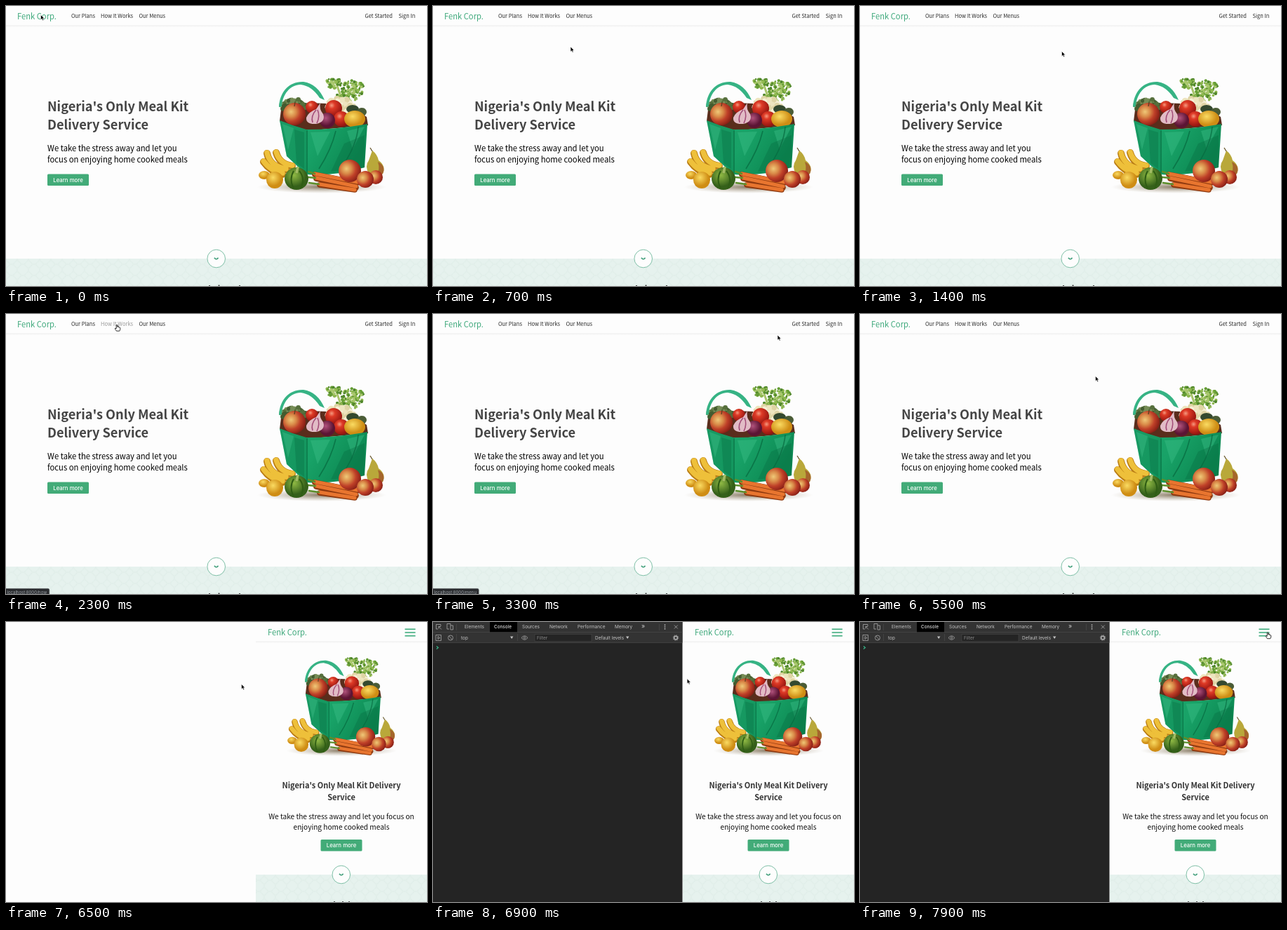
Animation of 600x399 px, one loop 8 s. Source, as an HTML page:

```html
<!DOCTYPE html>
<html lang="en">
<head>
<meta charset="utf-8">
<title>Meal kit landing page</title>
<style>
html, body { margin: 0; width: 100%; height: 100%; overflow: hidden; background: #fdfdfd; }
svg { display: block; width: 600px; height: 399px; }
.page { font-family: "Noto Sans CJK JP", "Noto Sans CJK SC", "Noto Sans CJK", "Noto Sans", sans-serif; }
.brand { font-size: 11.2px; fill: #3fa97c; text-anchor: start; }
.nav { font-size: 7.5px; fill: #2b2b2b; }
.nav .hover { fill: #999; }
.title { font-size: 18.2px; font-weight: 700; fill: #444; }
.lead { font-size: 11.27px; fill: #000; }
.narrow { text-anchor: middle; }
.narrow .title { font-size: 11px; fill: #333; }
.narrow .lead { font-size: 10.1px; font-weight: 300; fill: #111; }
.button text { font: 500 7.8px Inter, sans-serif; fill: #fff; text-anchor: middle; }
.tools { font: 6.45px Inter, sans-serif; fill: #c4c4c4; }
#url { font: 6px Inter, sans-serif; fill: #9aa0a6; }
.line { fill: none; stroke: #a9a9a9; stroke-width: .8; }
</style>
</head>
<body>
<svg viewBox="0 0 600 399">
  <defs>
    <pattern id="rings" width="16" height="16" patternUnits="userSpaceOnUse">
      <g fill="none" stroke="#e0eee9" stroke-width=".8">
        <circle cx="8" cy="8" r="7.6"/><circle r="5"/><circle cx="16" r="5"/>
        <circle cy="16" r="5"/><circle cx="16" cy="16" r="5"/>
      </g>
    </pattern>
    <radialGradient id="apple" cx=".35" cy=".4" r=".65">
      <stop offset="0" stop-color="#efc878"/><stop offset=".35" stop-color="#d98a48"/>
      <stop offset=".65" stop-color="#bf4028"/><stop offset="1" stop-color="#8a2016"/>
    </radialGradient>
    <radialGradient id="red" cx=".38" cy=".32" r=".65">
      <stop offset="0" stop-color="#f59a80"/><stop offset=".3" stop-color="#de3a26"/><stop offset="1" stop-color="#981510"/>
    </radialGradient>
    <radialGradient id="yellow" cx=".4" cy=".35">
      <stop offset="0" stop-color="#fadb62"/><stop offset="1" stop-color="#cf8d14"/>
    </radialGradient>
    <radialGradient id="green" cx=".4" cy=".35">
      <stop offset="0" stop-color="#8fb944"/><stop offset="1" stop-color="#35601a"/>
    </radialGradient>
    <radialGradient id="purple" cx=".4" cy=".35">
      <stop offset="0" stop-color="#b0527c"/><stop offset="1" stop-color="#5c1434"/>
    </radialGradient>
    <radialGradient id="shade">
      <stop offset="0" stop-color="#6b5a40" stop-opacity=".8"/><stop offset="1" stop-color="#a89a80" stop-opacity="0"/>
    </radialGradient>
    <linearGradient id="cloth" x2="1" y2=".4">
      <stop offset="0" stop-color="#1fa56d"/><stop offset=".5" stop-color="#18a267"/><stop offset="1" stop-color="#0c8852"/>
    </linearGradient>
    <linearGradient id="fade" x2="0" y2="1">
      <stop offset="0" stop-color="#ededed"/><stop offset="1" stop-color="#fdfdfd"/>
    </linearGradient>

    <g id="photo">
      <ellipse cx="450" cy="258" rx="92" ry="9" fill="url(#shade)"/>
      <path d="M480 140Q476 124 470 108M485 142Q487 126 494 116" fill="none" stroke="#a8c46a" stroke-width="3"/>
      <g id="leaves"></g>
      <path d="M390 164L392 148L430 138L486 140L514 158L516 170L428 178Z" fill="#5a2d1c"/>
      <g id="florets"></g>
      <path d="M389 144C390 122 404 107 424 108Q444 111 454 134L447 131Q436 114 420 112C405 112 394 126 393 143Z" fill="#36b384"/>
      <ellipse cx="494" cy="147" rx="9" ry="6" fill="#34492f"/>
      <ellipse cx="507" cy="151" rx="7" ry="6" fill="#4a5c36"/>
      <circle cx="436" cy="144" r="9" fill="url(#red)"/>
      <circle cx="467" cy="146" r="12" fill="url(#red)"/>
      <circle cx="478" cy="161" r="11" fill="url(#red)"/>
      <ellipse cx="497" cy="161" rx="15" ry="12" fill="url(#yellow)"/>
      <circle cx="411" cy="154" r="16" fill="url(#apple)"/>
      <path d="M411 143l1-6" stroke="#5a4022" stroke-width="1.3"/>
      <circle cx="458" cy="163" r="11" fill="url(#purple)"/>
      <path d="M448 138Q446 147 452 154Q456 165 442 168Q427 169 428 159Q431 151 442 147Z" fill="#e2bcc6"/>
      <path d="M442 148Q434 157 437 166M444 148Q448 157 443 167" fill="none" stroke="#a24d78" stroke-width="1.6"/>
      <path d="M390 163Q409 171 428 176Q472 176 515 168L511 230Q470 243 428 240L400 214Z" fill="url(#cloth)"/>
      <path d="M428 176V240L400 214L390 163Q410 172 428 176Z" fill="#0b7d4d" opacity=".3"/>
      <path d="M394 168L410 174L402 205ZM434 180L462 179L444 214ZM486 178L511 172L494 204Z" fill="#3bbd86" opacity=".45"/>
      <path d="M463 236L482 196L511 184V230ZM411 176L425 180V232L414 224Z" fill="#076b40" opacity=".35"/>
      <path d="M429 177V238M470 178Q464 204 446 232M502 172Q500 197 481 226" fill="none" stroke="#076b40" stroke-width="1.6" opacity=".75"/>
      <g fill="none" stroke-linecap="round">
        <path d="M372 210Q376 229 399 233M385 209Q390 226 408 228M367 222Q377 236 394 240" stroke="#b97c14" stroke-width="10"/>
        <path d="M372 209Q376 228 399 232M385 208Q390 225 408 227M367 221Q377 235 394 238" stroke="#eec03a" stroke-width="7.5"/>
        <path d="M440 240L501 252M442 246L499 259M447 255L497 262" stroke="#8f3a10" stroke-width="7.5"/>
        <path d="M440 239L501 251M442 245L499 257M447 254L497 262" stroke="#e8752f" stroke-width="5"/>
        <path d="M440 239l-9-3M441 245l-10-1M446 254l-14-2" stroke="#5c8f2b" stroke-width="2.5"/>
      </g>
      <ellipse cx="368" cy="241" rx="8" ry="6" fill="url(#yellow)"/>
      <circle cx="383" cy="248" r="12" fill="url(#yellow)"/>
      <ellipse cx="414" cy="246" rx="17" ry="16" fill="url(#green)"/>
      <path d="M410 235Q403 247 410 260M418 235Q427 246 420 260" fill="none" stroke="#2f5d14" stroke-width="2"/>
      <path d="M414 238l2-9" stroke="#a3bd65" stroke-width="3.5"/>
      <path d="M522 206Q529 211 531 220Q542 228 537 239Q527 247 517 239Q511 228 517 220Z" fill="#b9a83a"/>
      <path d="M530 222Q542 228 537 239L527 243Q534 234 530 222Z" fill="#a5662c"/>
      <path d="M522 207l-3-5" stroke="#65552a" stroke-width="1.3"/>
      <circle cx="490" cy="235" r="16" fill="url(#apple)"/>
      <circle cx="527" cy="244" r="10" fill="url(#apple)"/>
      <circle cx="512" cy="247" r="12" fill="url(#apple)"/>
    </g>

    <g id="more">
      <circle r="12.8" fill="#fdfdfd" stroke="#7fc0a7"/>
      <path d="M-2.8-1.2Q0 2.8 2.8-1.2" fill="none" stroke="#3c9c77" stroke-width="1.5"/>
    </g>
    <g id="cta" class="button">
      <rect width="59" height="16.6" rx="1.5" fill="#42ab78"/><text x="29.5" y="11.1">Learn more</text>
    </g>
  </defs>

  <rect width="600" height="399" fill="#fdfdfd"/>

  <g id="wide" class="page">
    <rect y="27.5" width="600" height="2.5" fill="url(#fade)"/>
    <text class="brand" x="16" y="18.5">Fenk Corp.</text>
    <g class="nav" id="links">
      <text x="93" y="17">Our Plans</text><text x="135" y="17">How It Works</text><text x="189.5" y="17">Our Menus</text>
      <text x="511.5" y="17">Get Started</text><text x="559.5" y="17">Sign In</text>
    </g>
    <text class="title" x="59" y="149.5">Nigeria's Only Meal Kit</text>
    <text class="title" x="59" y="176">Delivery Service</text>
    <text class="lead" x="59" y="207">We take the stress away and let you</text>
    <text class="lead" x="59" y="223">focus on enjoying home cooked meals</text>
    <use href="#cta" x="59" y="239.5"/>
    <use href="#photo"/>
    <rect y="360" width="600" height="39" fill="#e6f2ee"/>
    <rect y="360" width="600" height="39" fill="url(#rings)"/>
    <path d="M290 398v1M303.5 397.5v1.500M333 398v1" stroke="#333" stroke-width="1.8"/>
    <use href="#more" x="299.7" y="360"/>
  </g>

  <g id="narrow" class="page narrow">
    <rect x="356" y="27.5" width="244" height="2.5" fill="url(#fade)"/>
    <text class="brand" x="373" y="18.5">Fenk Corp.</text>
    <path d="M568.5 10.3h15M568.5 15h15M568.5 19.7h15" stroke="#35a877" stroke-width="1.6"/>
    <use href="#photo" transform="translate(92.6 -37.7) scale(.857)"/>
    <text class="title" x="478" y="237">Nigeria's Only Meal Kit Delivery</text>
    <text class="title" x="478" y="253.5">Service</text>
    <text class="lead" x="478" y="280.5">We take the stress away and let you focus on</text>
    <text class="lead" x="478" y="295.5">enjoying home cooked meals</text>
    <use href="#cta" x="448.5" y="310"/>
    <rect x="356" y="360" width="244" height="39" fill="#e6f2ee"/>
    <rect x="356" y="360" width="244" height="39" fill="url(#rings)"/>
    <path d="M468 398v1M480 398v1M489 398v1" stroke="#333" stroke-width="1.6"/>
    <use href="#more" x="477.8" y="360"/>
  </g>

  <g id="tools" class="tools">
    <rect width="355.5" height="399" fill="#242424"/>
    <rect width="355.5" height="29" fill="#333"/>
    <path d="M0 14.5H355.5M0 29.5H355.5M33.5 3v9M33.5 17v10M120.5 17v10M322.5 3v9" stroke="#484848" stroke-width=".8"/>
    <rect x="81" width="39" height="14.3" fill="#000"/>
    <text x="45" y="9.3">Elements</text><text x="87" y="9.3" fill="#fff">Console</text>
    <text x="127" y="9.3">Sources</text><text x="166" y="9.3">Network</text>
    <text x="206" y="9.3">Performance</text><text x="259" y="9.3">Memory</text>
    <text x="297" y="9.3" style="font-size:9px">»</text>
    <text x="40" y="25">top</text><text x="231" y="25">Default levels</text>
    <path d="M110 20.5h4.4l-2.2 3.6zM275 20.5h4.4l-2.2 3.6z"/>
    <rect x="145" y="17.3" width="81" height="10.5" fill="#242424" stroke="#484848" stroke-width=".6"/>
    <text x="148" y="25" fill="#888">Filter</text>
    <g class="line">
      <path d="M11 6V3.5H4.5V10H7M8 6.5l4 4M8 9.5v-3h3M23 10h-3V2.5h5V5M25 5h3.5v6H25zM343.8 4.5l5 5M348.8 4.5l-5 5M4 18.5h7.5v8H4zM7 20.5v4l3-2zM22.5 20l5 5"/>
      <circle cx="25" cy="22.5" r="3.5"/>
      <path d="M126 22.5Q130.5 17 135 22.5Q130.5 28 126 22.5Z"/>
      <circle cx="130.5" cy="22.5" r="1.3"/>
      <circle cx="346" cy="22.5" r="2.4" stroke-width="1.6"/>
      <circle cx="346" cy="22.5" r="3.8" stroke-dasharray="1.5 1.48"/>
    </g>
    <path d="M330.5 3.5v7" stroke="#c4c4c4" stroke-width="1.5" stroke-dasharray="1.5 1.2"/>
    <path d="M5 34.5l2.5 2-2.5 2" fill="none" stroke="#39b58a" stroke-width="1.2"/>
  </g>

  <g id="status">
    <rect id="statusBox" x="-3" y="391.3" height="12" rx="2" fill="#2b2d30" stroke="#55585c" stroke-width=".6"/>
    <text id="url" x="1.5" y="398.6"></text>
  </g>

  <g id="cursor" stroke-linejoin="round">
    <path id="arrow" d="M0 0V7.2L1.7 5.7L2.8 8.2L4.1 7.6L3 5.2H5.2Z" fill="#000" stroke="#fff" stroke-width=".6"/>
    <path id="hand" d="M-.8.8Q0-.7.8.8V3.5Q2-.1 2.3 3.9Q3.6 3 3.7 4.4Q4.9 4 4.8 5.4Q4.9 7.8 3.8 9.2H-.6Q-1.4 7.7-2.8 6Q-2.7 4.5-.8 5.8Z" fill="#fff" stroke="#000" stroke-width=".8"/>
  </g>
</svg>
<script>
const $ = id => document.getElementById(id);
const LOOP = 8000, NARROW_AT = 6300, TOOLS_AT = 6600;

// Cursor stops: time, x, y
const path = [
  [0, 49.5, 12.5], [100, 49.5, 12.5], [700, 196, 58], [900, 196, 58], [1400, 287.5, 64.5],
  [1700, 168, 46], [1800, 168, 46], [2000, 108, 15], [2300, 158, 15], [2600, 208, 15], [2700, 208, 15],
  [3300, 491, 30], [3500, 520, 16], [3600, 545, 15], [3700, 570, 15], [3900, 570, 15],
  [4100, 536, 15], [4800, 536, 15], [5500, 335.5, 88.5], [6800, 335.5, 88.5],
  [7700, 575, 19], [7900, 581, 14.5], [LOOP, 581, 14.5]
];
const statuses = [
  [1900, "plans"], [2200, "how"], [2500, "menu"], [3500, "me"], [5200, ""]
];
// Link extents, in document order
const links = [[93, 127], [135, 181], [189, 227], [511, 551], [559, 583]];

let seed = 7;
const random = () => (seed = seed * 16807 % 2147483647) / 2147483647;

function cluster(cx, cy, rx, ry, size, count, colors) {
  let dots = "";
  for (let i = 0; i < count; i++) {
    const angle = random() * 2 * Math.PI, reach = Math.sqrt(random());
    const x = cx + rx * reach * Math.cos(angle), y = cy + ry * reach * Math.sin(angle);
    dots += `<circle cx="${x}" cy="${y}" r="${size * (.6 + random() * .6)}" fill="${colors[i % colors.length]}"/>`;
  }
  return dots;
}
const leafColors = ["#4f862a", "#8fb850", "#659d34", "#a9c76c"];
$("leaves").innerHTML =
  cluster(467, 110, 11, 8, 2, 45, leafColors) +
  cluster(494, 118, 17, 12, 2, 85, leafColors) +
  cluster(484, 132, 16, 8, 2, 40, leafColors);
$("florets").innerHTML =
  cluster(477, 142, 20, 10, 4, 60, ["#eee5bf", "#f7f0d6", "#dfd4a5"]) +
  cluster(409, 143, 18, 11, 3, 90, ["#566f3c", "#768c56", "#435c30"]);

function cursorAt(t) {
  const next = path.findIndex(stop => stop[0] > t);
  const [t0, x0, y0] = path[next - 1], [t1, x1, y1] = path[next];
  const k = (t - t0) / (t1 - t0);
  return [x0 + (x1 - x0) * k, y0 + (y1 - y0) * k];
}

const show = (id, visible) => $(id).style.display = visible ? "" : "none";

function draw(now) {
  const t = Math.floor(now % LOOP / 100) * 100;
  const narrow = t >= NARROW_AT;
  const [x, y] = cursorAt(t);
  const onRow = y > 7 && y < 22;
  const hovered = narrow ? -1 : links.findIndex(([a, b]) => onRow && x >= a && x <= b);
  const onMenu = narrow && onRow && x > 568 && x < 584;
  const page = statuses.filter(s => s[0] <= t).pop()?.[1];

  show("wide", !narrow);
  show("narrow", narrow);
  show("tools", t >= TOOLS_AT);
  show("status", page);
  if (page) {
    const url = "localhost:8000/" + page;
    $("url").textContent = url;
    $("statusBox").setAttribute("width", 3 + url.length * 3.43);
  }
  [...$("links").children].forEach((link, i) => link.classList.toggle("hover", i === hovered));
  show("hand", hovered >= 0 || onMenu);
  show("arrow", hovered < 0 && !onMenu);
  $("cursor").setAttribute("transform", `translate(${x} ${y})`);
}

const start = performance.now();
function tick() {
  draw(performance.now() - start);
  requestAnimationFrame(tick);
}
tick();
</script>
</body>
</html>
```
